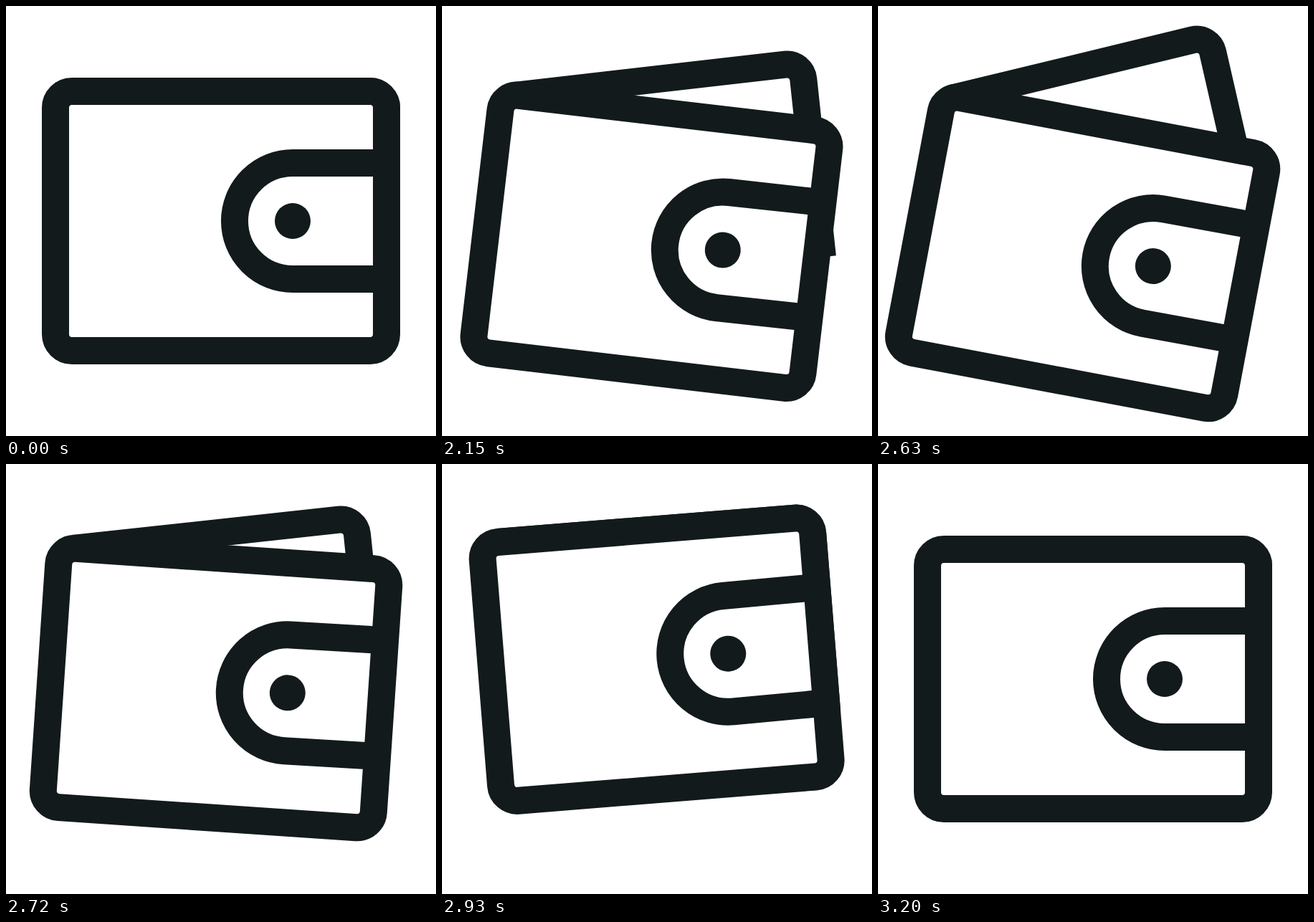
Animation of 600x600 px, one loop 3.23 s. Source, as an HTML page:

```html
<!DOCTYPE html>
<html lang="en">
<head>
<meta charset="utf-8">
<title>Wallet</title>
<style>
  html, body { margin: 0; width: 100%; height: 100%; overflow: hidden; background: #fff; }
  svg { display: block; width: 100vw; height: 100vh; }
  .line { fill: none; stroke: #121a1c; stroke-width: 38; }
  #dot { fill: #121a1c; }
</style>
</head>
<body>
<svg viewBox="0 0 600 600">
  <path id="card" class="line"/>
  <g id="wallet">
    <rect class="line" x="69" y="119" width="462" height="362" rx="23" style="fill:#fff"/>
    <g id="flap">
      <path class="line" d="M531 219H400a81 81 0 0 0 0 162H531"/>
      <circle id="dot" cx="400" cy="300" r="25"/>
    </g>
  </g>
</svg>
<script>
const LOOP = 3230, REST = 2000, STEP = 30;
const PIVOT = { x: 50, y: 250 };
const CORNER = { x: 92, y: 142 };
const [card, wallet, flap] = ['card', 'wallet', 'flap'].map(id => document.getElementById(id));

const clamp = v => Math.min(1, Math.max(0, v));
const smooth = (n, a, b) => {
  const x = clamp((n - a) / (b - a));
  return x * x * (3 - 2 * x);
};
const swing = (n, length, power = 1) => Math.sin(Math.PI / 2 * clamp(n / length) ** power);

// step, extra flap angle
const FLAP = [[0, 0], [1, -.6], [12, -.15], [15, -.1], [21, -.35], [26, -.6], [31, -.7], [40, 0]];
function lerpKeys(keys, n) {
  const i = Math.max(1, keys.findIndex(k => k[0] >= n));
  const [a, u] = keys[i - 1], [b, v] = keys[i];
  return u + (v - u) * (n - a) / (b - a);
}

function pose(n) {
  const settle = 1 - smooth(n, 30, 40);
  const angle = n < 18 ? 13 * swing(n, 14.5)
    : (13 - 17.73 * smooth(n, 18.6, 29.2)) * settle;
  const dx = -3.7 * smooth(n, 18.8, 26) * settle;
  const dy = -7.3 * smooth(n, 18.8, 28.2) * settle;
  const open = swing(n, 15, 1.08);
  return {
    angle, dx, dy,
    lift: 28.7 * open * (1 - smooth(n, 18.9, 27.4)),
    slide: 79 * open * (1 - smooth(n, 19.1, 29.5)),
    flap: lerpKeys(FLAP, n)
  };
}

function draw(n) {
  const p = pose(n);
  const move = `translate(${p.dx} ${p.dy}) rotate(${p.angle} ${PIVOT.x} ${PIVOT.y})`;
  wallet.setAttribute('transform', move);
  flap.setAttribute('transform', `rotate(${p.flap} 400 300)`);
  // The card hinges on the wallet's top left corner.
  const width = 416 - p.slide;
  const lean = p.lift * .13;
  card.setAttribute('transform', `${move} translate(${CORNER.x} ${CORNER.y}) rotate(${-p.lift})`);
  card.setAttribute('d', `M0-23H${width}a23 23 0 0 1 23 23l${-lean} 250`);
}

const start = performance.now();
function tick() {
  const t = (performance.now() - start) % LOOP;
  draw(Math.min(40, Math.max(0, Math.floor((t - REST) / STEP))));
  requestAnimationFrame(tick);
}
tick();
</script>
</body>
</html>
```
